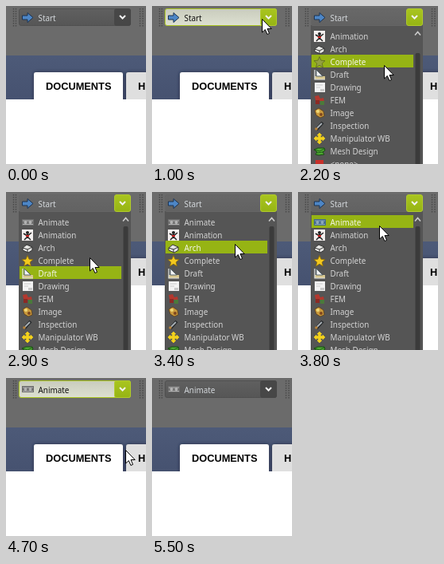
These frames come from a looping animation (176x198 px, 6000 ms). An HTML page:

```html
<!DOCTYPE html>
<html lang="en">
<head>
<meta charset="utf-8">
<title>Workbench selector</title>
<style>
  html, body { margin: 0; width: 100%; height: 100%; overflow: hidden; background: #fff; }
  svg { display: block; width: 176px; height: 198px; }
  .ui { font: 9.9px "Noto Sans", "Open Sans", sans-serif; }
  .tab { font: bold 12.8px "Liberation Sans", Arial, sans-serif; fill: #000; }
</style>
</head>
<body>
<svg viewBox="0 0 176 198">
  <defs>
    <linearGradient id="band" x2="0" y2="1">
      <stop stop-color="#4d5a78"/><stop offset="1" stop-color="#465270"/>
    </linearGradient>
    <linearGradient id="plain" x2="0" y2="1">
      <stop stop-color="#606060"/><stop offset="1" stop-color="#565656"/>
    </linearGradient>
    <linearGradient id="pressed" x2="0" y2="1">
      <stop stop-color="#686868"/><stop offset="1" stop-color="#626262"/>
    </linearGradient>
    <linearGradient id="focus" x2="0" y2="1">
      <stop stop-color="#c9ccbd"/><stop offset="1" stop-color="#dde0d1"/>
    </linearGradient>
    <linearGradient id="lime" x2="0" y2="1">
      <stop stop-color="#a9c51f"/><stop offset="1" stop-color="#96b414"/>
    </linearGradient>
    <filter id="shade" x="-10%" y="-20%" width="120%" height="140%">
      <feDropShadow dx="0" dy="0" stdDeviation="2" flood-color="#1c2438" flood-opacity=".75"/>
    </filter>
    <clipPath id="below"><rect y="24" width="176" height="174"/></clipPath>
    <clipPath id="rowsArea"><rect x="16" y="29" width="130" height="340"/></clipPath>
    <clipPath id="page"><rect width="176" height="117"/></clipPath>
  </defs>

  <rect width="176" height="198" fill="#fff"/>
  <rect width="176" height="62" fill="#6b6b6b"/>
  <g clip-path="url(#page)">
    <rect y="62" width="176" height="55" fill="url(#band)"/>
    <rect x="35" y="83" width="112" height="42" rx="3" fill="#fff" filter="url(#shade)"/>
    <rect x="151" y="83" width="90" height="42" rx="3" fill="#dfdfdf" filter="url(#shade)"/>
    <text class="tab" x="50" y="105">DOCUMENTS</text>
    <text class="tab" x="166" y="105">HELP</text>
  </g>
  <g stroke="#484848" stroke-width="1.4" stroke-dasharray="1.5 1.5">
    <path d="M9.5 3V26M12.5 3V26M168.5 3V26M172 3V26"/>
  </g>

  <g id="popup" clip-path="url(#below)">
    <g id="sheet">
      <rect x="16" y="20" width="141" height="350" fill="#555"/>
      <g clip-path="url(#rowsArea)"><g id="rows" class="ui"></g></g>
      <path d="M147 36.500l3.500-4 3.500 4" fill="none" stroke="#ccc" stroke-width="1.6"/>
      <rect id="thumb" x="147.500" width="6" height="240" rx="2" fill="#3b3b3b"/>
    </g>
  </g>

  <g class="ui">
    <rect id="combo" x="16.500" y="3.500" width="140" height="21" rx="2.500"/>
    <rect id="button" x="136.500" y="3.500" width="20" height="21" rx="2.500"/>
    <path d="M143 12l3.500 3.500 3.500-3.500" fill="none" stroke="#f2f2f2" stroke-width="2"/>
    <g id="startIcon" transform="translate(20 7)"></g>
    <g id="animateIcon" transform="translate(20 7)"></g>
    <text id="label" x="40.500" y="18.500"></text>
  </g>

  <path id="cursor" d="M0 0V16.500L3.800 13L6.400 19L9 17.900L6.500 12H11.700Z" fill="#fff" stroke="#000" stroke-linejoin="round"/>
</svg>
<script>
const LOOP = 6000, STEP = 100, ROW = 16, LIST_TOP = 30;
const $ = id => document.getElementById(id);
const shape = (d, fill, extra = '') => `<path d="${d}" fill="${fill}" ${extra}/>`;
const stroke = (d, color, width = 1.5) => shape(d, 'none', `stroke="${color}" stroke-width="${width}"`);
const box = (x, y, w, h, fill) => `<rect x="${x}" y="${y}" width="${w}" height="${h}" fill="${fill}"/>`;
const dot = (x, y, r, fill) => `<circle cx="${x}" cy="${y}" r="${r}" fill="${fill}"/>`;

const startIcon = shape('M0.500 5H7V1.500L14 7.500L7 13.500V10H0.500Z', '#4d86c6', 'stroke="#1d3350"');
const reel = (body, detail) => box(0, 3, 15, 8, body) +
  stroke('M1 5H14M1 9.500H14', detail, 1) + dot(4.5, 7, 2, detail) + dot(10.5, 7, 2, detail);
const star = (fill, edge) => shape(
  'M7 .5L9 5.200L14 5.600L10.200 9L11.400 14L7 11.200L2.600 14L3.800 9L0 5.600L5 5.200Z',
  fill, `stroke="${edge}" stroke-width=".8"`);
const greyReel = reel('#6c6c6c', '#b4b4b4');

// Each entry: label, its 14 px icon and, where it differs, the icon while selected.
const items = [
  ['Animate', greyReel, reel('#41698f', '#8fa9b8')],
  ['Animation', box(0, 0, 14, 14, '#f3efee') + dot(7, 4, 2, '#222') +
    stroke('M2 5L7 8L12 4M7 6V9L3 13M7 9L11 13', '#222') + stroke('M5 8H9', '#c22', 2)],
  ['Arch', shape('M1 7L6 3L13 6V10L8 13L1 10Z', '#e4e4e2', 'stroke="#333"') +
    stroke('M1 7L7 9L13 6M7 9V13', '#333', 1)],
  ['Complete', star('#f3c81e', '#8a6a08'), star('#93a040', '#5d6a1c')],
  ['Draft', box(1, 9, 13, 4, '#d8c890') + shape('M3 1V9H11Z', '#f0f2f2', 'stroke="#56646c"') +
    stroke('M1 1V13H14', '#dfe4e6', 1.2)],
  ['Drawing', box(1, 1, 13, 12, '#f2f2f2') + stroke('M3 4H11M3 7H8', '#ccc', 1) + box(8, 9, 5, 3, '#c8c8c8')],
  ['FEM', shape('M1 2L6 1L8 5L12 4L13 9L9 8L5 8L2 7Z', '#b3382e') + box(2, 7, 5, 5, '#8c2a24') +
    box(8, 8, 5, 5, '#4b7a3a')],
  ['Image', shape('M1 4L6 1L12 5L13 11L8 13L3 10Z', '#c99a3c', 'stroke="#5c3d18" stroke-width=".8"') +
    dot(5, 5, 2, '#f0d878') + dot(9, 9, 2, '#80481f')],
  ['Inspection', stroke('M3 12L11 3', '#25282b', 4) + stroke('M4 10L10 4', '#a9b0b5', 1.8) +
    dot(3, 11, 1.8, '#b8843c')],
  ['Manipulator WB', shape('M7 0L10 3H8.500V5.500H11V4L14 7L11 10V8.500H8.500V11H10L7 14L4 11H5.500V8.500H3V10L0 7L3 4V5.500H5.500V3H4Z',
    '#f3d21b', 'stroke="#f3d21b" stroke-width=".6"')],
  ['Mesh Design', shape('M0 5L5 3L13 3L14 6L11 8L13 11L6 12L2 11L4 8Z', '#4fa832', 'stroke="#174b12"') +
    stroke('M1 5L7 7L13 4M4 9L11 8', '#174b12', .8)],
  ['<none>', box(2, 2, 10, 10, '#c8302a')],
  ['OpenSCAD', dot(7, 7, 6, '#e6c52b')],
  ['Part Design', box(1, 4, 9, 9, '#3f73b5') + shape('M4 1L13 3V8L8 7Z', '#e5c43c')],
  ['Part', box(1, 3, 10, 10, '#e0b52e')],
  ['Path', stroke('M1 12L6 4L9 9L13 2', '#6fae3f', 2)],
  ['Start', startIcon]
];

$('rows').innerHTML = items.map(([name, icon, selectedIcon = icon], i) => `
  <g transform="translate(0 ${LIST_TOP + i * ROW})">
    <g class="on"><rect x="17" y="-1" width="128" height="16" fill="#96b414"/></g>
    <g class="off" transform="translate(20 1)">${icon}</g>
    <g class="on" transform="translate(20 1)">${selectedIcon}</g>
    <text x="40.500" y="11.500">${name.replace('<', '&lt;')}</text>
  </g>`).join('');
const rows = [...$('rows').children];
$('startIcon').innerHTML = startIcon;
$('animateIcon').innerHTML = greyReel;

// Pointer stops: time, x, y
const pointer = [
  [300, 172, 125], [900, 139, 11], [1000, 138, 16], [1900, 138, 16], [2200, 108, 74],
  [2600, 105, 82], [3100, 105, 82], [3800, 102, 42], [4100, 102, 42],
  [4700, 150, 90], [4800, 153, 89], [4900, 158, 88], [5000, 158, 88], [5100, 162, 86], [5500, 162, 86]
];
// Vertical offset while the list unrolls
const unroll = [[1300, -220], [1600, -30], [1700, -30], [1800, 0]];

function along(stops, t) {
  let i = 1;
  while (i < stops.length - 1 && t > stops[i][0]) i++;
  const [t0, ...a] = stops[i - 1], [t1, ...b] = stops[i];
  const k = Math.min(1, Math.max(0, (t - t0) / (t1 - t0)));
  return a.map((v, n) => v + (b[n] - v) * k);
}

function show(node, visible) {
  node.setAttribute('display', visible ? 'inline' : 'none');
}

function selectedRow(t, y, scroll) {
  if (t < 1800 || y < LIST_TOP) return -1;
  if (t >= 2700 && t < 3000) return 4; // scrolling keeps the old selection
  return Math.floor((y - LIST_TOP) / ROW) + scroll;
}

function draw(time) {
  const t = Math.floor(time / STEP) * STEP;
  const [x, y] = along(pointer, t).map(Math.round);
  const open = t >= 1300 && t < 4000;
  const active = t >= 1000 && t < 5500;
  const pressed = t >= 1800 && t < 4000;
  const light = active && !pressed;
  const chosen = t >= 4000;
  const scroll = t < 2800 ? 1 : 0;
  const selected = selectedRow(t, y, scroll);

  show($('popup'), open);
  $('sheet').setAttribute('transform', `translate(0 ${along(unroll, t)[0]})`);
  $('rows').setAttribute('transform', `translate(0 ${-scroll * ROW})`);
  $('thumb').setAttribute('y', 43 + scroll * ROW);
  rows.forEach((row, i) => {
    const on = i === selected;
    row.querySelectorAll('.on').forEach(node => show(node, on));
    show(row.querySelector('.off'), !on);
    row.querySelector('text').setAttribute('fill', on ? '#f4f6ea' : '#d4d4d4');
  });

  $('combo').setAttribute('fill', `url(#${light ? 'focus' : pressed ? 'pressed' : 'plain'})`);
  $('combo').setAttribute('stroke', light ? '#a9c31f' : pressed ? '#666' : '#505050');
  $('button').setAttribute('fill', active ? 'url(#lime)' : '#474747');
  $('button').setAttribute('stroke', active ? '#b0ca2c' : '#474747');
  $('label').setAttribute('fill', light ? '#111' : '#d4d8dc');
  $('label').textContent = chosen ? 'Animate' : 'Start';
  show($('startIcon'), !chosen);
  show($('animateIcon'), chosen);

  show($('cursor'), t >= 300 && t < 5500);
  $('cursor').setAttribute('transform', `translate(${x + .5} ${y + .5})`);
}

const begin = performance.now();
function tick() {
  draw((performance.now() - begin) % LOOP);
  requestAnimationFrame(tick);
}
tick();
</script>
</body>
</html>
```
